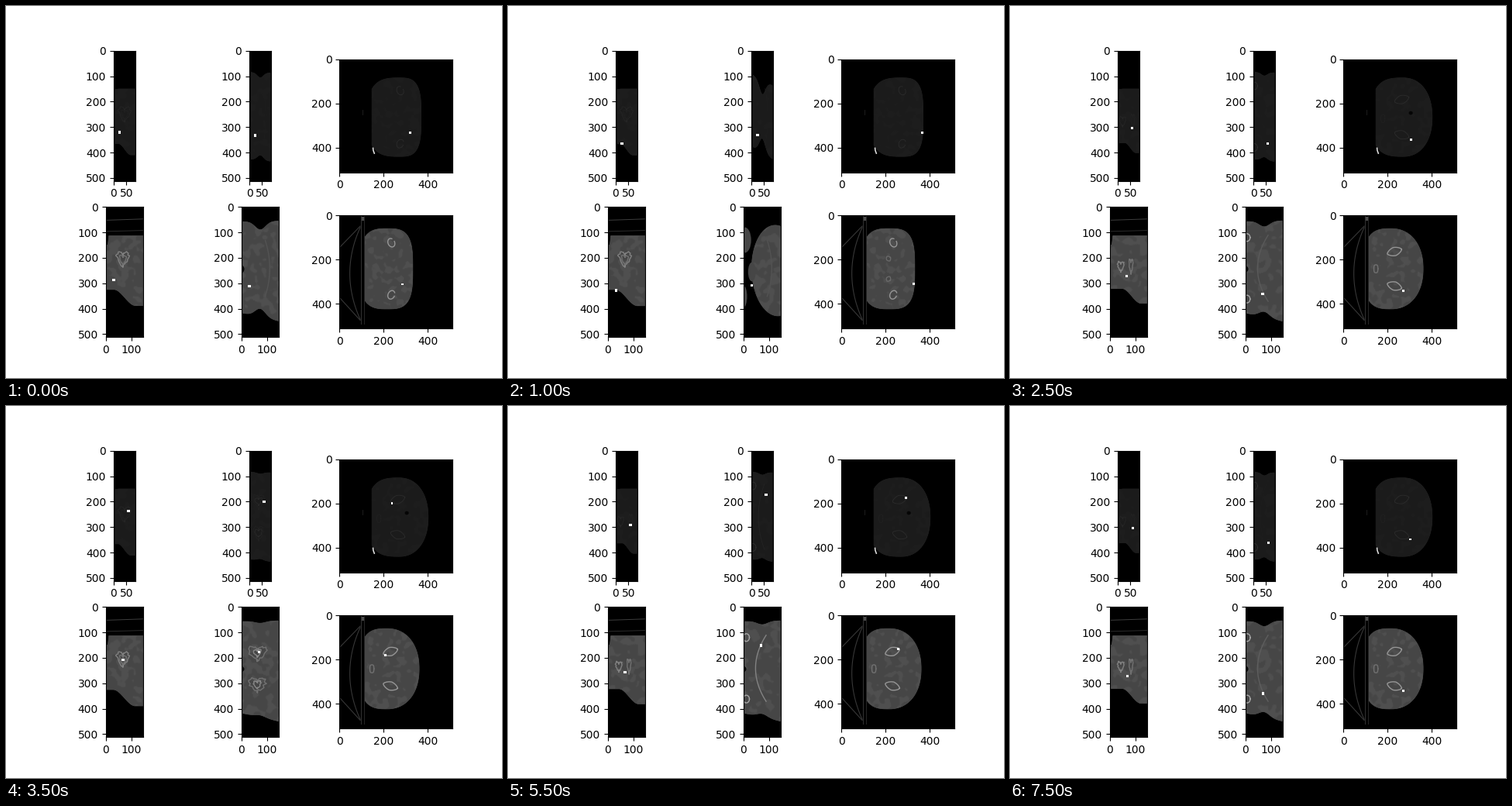
A matplotlib script for the animation above (8 s loop, 640 px wide and 480 px high).

```python
import matplotlib.pyplot as plt
import numpy as np
from matplotlib.animation import ArtistAnimation
from matplotlib.patches import Ellipse, Polygon, Rectangle

# Landmarks visited in the upper scan: x, y, slice
LANDMARKS = [
    (321, 333, 22), (318, 192, 22), (366, 331, 24), (240, 340, 57),
    (292, 176, 57), (305, 364, 57), (238, 338, 57), (238, 200, 58),
    (298, 175, 58), (303, 360, 58), (240, 338, 58), (292, 173, 58),
    (300, 358, 60), (356, 201, 25), (296, 174, 60), (303, 362, 60),
]

UPPER = dict(
    depth=86, span=(6, 83), base=27, tint=29, skin=35, bone=44, lw=0.6,
    split=40, front=150, step=2, foot=366, rise=45, heart=(43, 245),
    near=238, far=366, mid=255, lean=0.07, half=171, grow=0.04, notch=(6, 50),
    tip=0.5, lens=False,
    center=(270, 262), tall=178, back=143, bed=147, reach=(100, 132),
    femur=(275, 120), hip=(264, 80), ischium=(249, 43), sacrum=(179, 268),
)
LOWER = dict(
    depth=148, span=(0, 148), base=70, tint=79, skin=78, bone=150, lw=1.0,
    split=50, front=113, step=36, foot=325, rise=64, heart=(67, 201),
    near=208, far=328, mid=237, lean=0.1, half=180, grow=0.12, notch=(8, 88),
    tip=0, lens=True,
    center=(215, 241), tall=182, back=125, bed=115, reach=(117, 146),
    femur=(235, 118), hip=(231, 78), ischium=(213, 46), sacrum=(147, 241),
)


def gray(v):
    return str(v / 255)


def ramp(t):
    t = np.clip(t, 0, 1)
    return t * t * (3 - 2 * t)


def power(v, n):
    return np.sign(v) * np.abs(v)**(2 / n)


def oval(x, y, w, h, n=2, tilt=0, sweep=360):
    """Superellipse outline, tilted by degrees."""
    t = np.radians(np.linspace(0, sweep, 60))
    u, v, a = w / 2 * power(np.cos(t), n), h / 2 * power(np.sin(t), n), np.radians(tilt)
    return np.c_[x + u * np.cos(a) - v * np.sin(a),
                 y + u * np.sin(a) + v * np.cos(a)]


def heart(x, y, w, h, seed):
    """Jagged heart outline, tip down."""
    t = np.linspace(0, 2 * np.pi, 40)
    jag = np.random.default_rng(seed).uniform(0.75, 1.1, t.size)
    u = jag * np.sin(t)**3
    v = -jag * (13 * np.cos(t) - 5 * np.cos(2 * t) - 2 * np.cos(3 * t)) / 16
    return np.c_[x + w * u, y + h * v]


def mottle(seed, n=128, cut=0.08):
    """Smooth seeded blotches, 0 to 1."""
    f = np.fft.fftfreq(n)
    band = np.exp(-(f[:, None]**2 + f**2) / (2 * cut**2))
    noise = np.random.default_rng(seed).normal(size=(n, n))
    s = np.fft.ifft2(np.fft.fft2(noise) * band).real
    return np.clip(3 * (s / s.std() - 0.4), 0, 1)


class Panel:
    """Collects the artists of one view in one frame."""

    def __init__(self, ax, scan, out):
        self.ax, self.scan, self.out = ax, scan, out

    def patch(self, p, z=1.3):
        p.set_zorder(z)
        self.out.append(self.ax.add_patch(p))
        return p

    def line(self, x, y, v, lw=None):
        self.out += self.ax.plot(x, y, color=gray(v), zorder=1.4,
                                 lw=lw or self.scan['lw'])

    def bone(self, pts, glow=1.0):
        self.line(*np.transpose(pts), self.scan['bone'] * glow)

    def blob(self, x, y, w, h, v):
        self.patch(Ellipse((x, y), w, h, fc=gray(v), lw=0))

    def body(self, pts, seed):
        s = self.scan
        p = self.patch(Polygon(pts, fc=gray(s['base']), ec=gray(s['skin']),
                               lw=0.5), 1)
        field = s['base'] + (s['tint'] - s['base']) * mottle(seed)
        im = self.ax.imshow(field, cmap='gray', vmin=0, vmax=255, zorder=1.1,
                            extent=(0, 512, 512, 0), interpolation='bilinear')
        im.set_clip_path(p)
        self.out.append(im)

    def marker(self, x, y):
        self.patch(Rectangle((x - 5, y - 5), 10, 10, fc='white', lw=0,
                             snap=True), 2)


def sagittal(p, x, y, z):
    s = p.scan
    (z0, z1), depth = s['span'], s['depth']
    side = np.clip((abs(y - s['center'][1]) - 66) / 31, 0, 1)
    zs = np.linspace(z1, z0, 60)
    start, stop = 0.2 + 0.13 * side, 0.78 + 0.05 * side
    low = s['foot'] - 4 * side + (s['rise'] - 6 * side) * ramp(
        (zs / depth - start) / (stop - start))
    top = s['front']
    p.body([(z0, top + s['step']), (z0 + 8, top + s['step']), (z0 + 12, top),
            (z1, top), *zip(zs, low)], 3 + (side > 0.5))
    hx, hy = s['heart']
    if side < 0.5:
        p.bone(heart(hx, hy, 26, 36, 1), 0.85)
        p.bone(heart(hx, hy + 4, 15, 22, 2), 0.75)
    else:
        p.bone(heart(hx - 24, hy + 30, 14, 24, 3), 0.85)
        p.bone(heart(hx + 16, hy + 28, 8, 34, 4), 0.75)
    if s is LOWER:
        p.line([0, depth], [52, 47], 62, 0.7)
        p.line([0, depth], [96, 92], 45, 0.7)
    p.marker(z, x)


def coronal(p, x, y, z):
    s = p.scan
    depth = s['depth']
    t = np.clip((x - s['near']) / (s['far'] - s['near']), 0, 1)
    cut = s['lens'] and t > 0.95
    zs = np.linspace(32 if cut else s['span'][0], s['span'][1], 80)
    mid = s['mid'] + s['lean'] * zs + s['tip'] * t**12 * (zs - depth / 2)
    if cut:
        half = 178 * np.sqrt(1 - ((zs - 130) / 98)**2)
    else:
        base, deep = s['notch']
        half = s['half'] + s['grow'] * zs - 30 * t**8 - (
            base + deep * t**3) * np.exp(-((zs / depth - 0.5) / 0.2)**2)
    p.body(np.r_[np.c_[zs, mid - half], np.c_[zs, mid + half][::-1]],
           20 + int(8 * t))

    m = s['mid'] + 4
    if t < 0.25:
        for k in (-1, 1):
            p.bone(heart(0.42 * depth, m + 62 * k, 0.25 * depth, 34, 5 + k), 0.75)
            p.bone(heart(0.42 * depth, m + 62 * k, 16, 18, 8 + k), 0.9)
    elif t < 0.6:
        for k in (-1, 1):
            p.bone(oval(0.25 * depth * (0.7 - t), m + 121 * k, 24, 30), 1.1)
        v = np.linspace(-1, 1, 30)
        glow = max(0.87 - 2 * (t - 0.4), 0.6)
        p.bone(np.c_[depth * (0.32 + 0.28 * v**2), m + 130 * v], glow)
    else:
        v = np.linspace(-1, 1, 30)
        p.line(depth * (0.75 - 0.12 * v**2), m + 110 * v, s['tint'] * 1.05)
    if cut:
        for c, e, w, h in ((5, 130, 50, 100), (0, 352, 28, 85), (33, 255, 30, 75)):
            p.blob(c, e, w, h, s['base'])
    elif s['lens']:
        p.blob(0, m + 3, 22, 20 + 50 * t**4, 4)
    p.marker(z, y)


def axial(p, x, y, z):
    s = p.scan
    high = z > s['split']
    cx, cy = s['center']
    t = np.linspace(0, 2 * np.pi, 400)
    c, front = np.cos(t), np.cos(t) > 0
    n = np.where(front, 2.2 if high else 3.3, 3)
    xs = cx + np.where(front, s['reach'][high], s['back']) * power(c, n)
    p.body(np.c_[np.maximum(xs, s['bed']), cy + s['tall'] * power(np.sin(t), n)],
           40 + high)

    for k in (-1, 1):
        if high:
            bx, off = s['hip']
            p.bone(oval(bx, cy + off * k, 68, 38, 1.5, 18 * k))
        else:
            bx, off = s['femur']
            p.bone(oval(bx, cy + off * k, 30, 40, 2, 25 * k, 310))
            if z > s['split'] * 0.57 + 3:
                bx, off = s['ischium']
                p.bone(oval(bx, cy + off * k, 20, 24, 1.5, 30 * k), 0.7)
    if high:
        p.bone(oval(*s['sacrum'], 18, 36, 3), 0.75)

    if s is UPPER:
        if high and z < 59:
            p.blob(305, 243, 18, 16, 5)
        p.line([152, 153, 158], [402, 412, 426], 230, 1.1)
        p.line([105, 105], [230, 250], 28, 0.7)
    else:
        table(p)
    p.marker(x, y)


def table(p):
    v = np.linspace(-1, 1, 60)
    p.line(94 - 47 * (1 - v**2), 262 + 208 * v, 55, 0.8)
    for k in (-1, 1):
        p.line([0, 94], [258 + 113 * k, 261 + 213 * k], 55, 0.8)
    p.line([96, 96], [0, 490], 48, 0.8)
    p.line([113, 113], [0, 490], 38, 0.7)
    p.patch(Rectangle((100, 4), 13, 20, fc=gray(75), lw=0))


def register(x, y, z):
    """Matching point in the lower scan."""
    return 0.92 * x + 0.025 * (y - 265) - 10.5, y - 22, int(1.03 * z + 8.8)


fig, axes = plt.subplots(2, 3, figsize=(6.4, 4.8), dpi=100)
for row, scan in zip(axes, (UPPER, LOWER)):
    for ax, width in zip(row, (scan['depth'], scan['depth'], 512)):
        ax.imshow(np.zeros((512, width)), cmap='gray', vmin=0, vmax=255)
        ax.autoscale(False)

frames = []
for mark in LANDMARKS:
    artists = []
    for row, scan, pos in zip(axes, (UPPER, LOWER), (mark, register(*mark))):
        for ax, view in zip(row, (sagittal, coronal, axial)):
            view(Panel(ax, scan, artists), *pos)
    frames.append(artists)

anim = ArtistAnimation(fig, frames, interval=500, repeat=True, repeat_delay=0)
plt.show()
```
